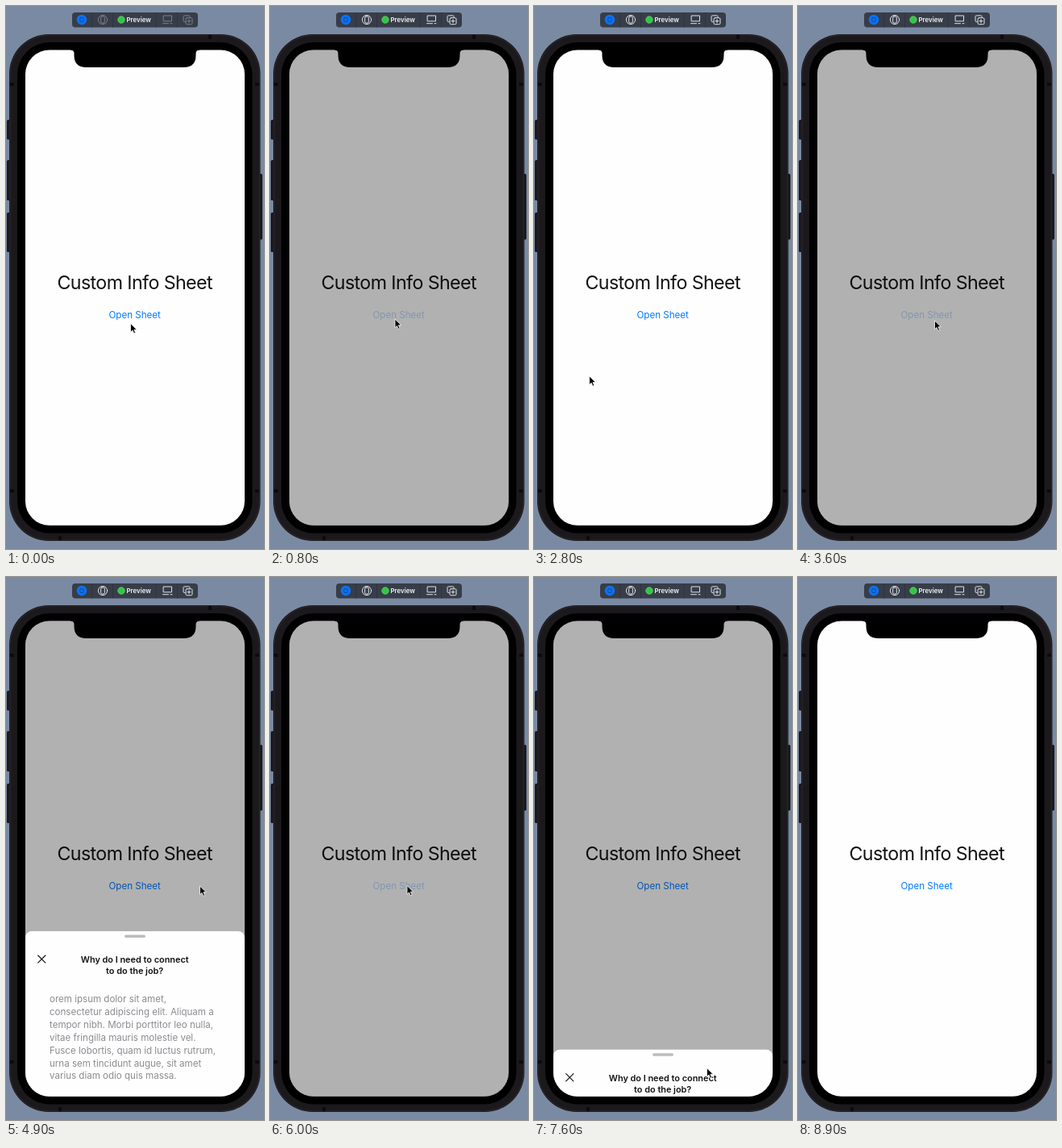
These frames come from a looping animation (320x673 px, 9.3 s). An HTML page:

```html
<!DOCTYPE html>
<html lang="en">
<head>
<meta charset="utf-8">
<title>Custom Info Sheet</title>
<style>
html, body { margin: 0; width: 100%; height: 100%; overflow: hidden; background: #7b8aa3; }
svg { display: block; width: 100%; height: 100%; }
text { font-family: Inter, Roboto, sans-serif; }
.mid { text-anchor: middle; }
.head { font-size: 10.9px; font-weight: 600; fill: #111; }
.body { font-size: 11.55px; fill: #8b8b8f; }
.line { fill: none; stroke-linecap: round; stroke-linejoin: round; }
</style>
</head>
<body>
<svg viewBox="0 0 320 673">
  <defs>
    <clipPath id="screen"><rect x="24" y="54.5" width="272" height="589.3" rx="30"/></clipPath>
  </defs>
  <rect width="320" height="673" fill="#7b8aa3"/>

  <g fill="#1b191c">
    <rect x="1" y="141" width="6" height="24.500" rx="1.500"/>
    <rect x="1" y="191" width="6" height="50" rx="1.500"/>
    <rect x="1" y="256" width="6" height="49" rx="1.500"/>
    <rect x="312" y="208" width="6" height="81.500" rx="1.500"/>
    <rect x="4" y="35" width="311.500" height="628" rx="49"/>
  </g>
  <rect x="5.200" y="36.200" width="309.100" height="625.600" rx="48" class="line" stroke="#2b292d"/>
  <g fill="#0c0b0d">
    <rect x="251" y="36" width="4" height="5"/>
    <rect x="65" y="657" width="4" height="5"/>
    <rect x="5" y="95" width="5" height="4"/>
    <rect x="5" y="599" width="5" height="4"/>
    <rect x="309" y="95" width="5" height="4"/>
    <rect x="309" y="599" width="5" height="4"/>
  </g>
  <rect x="14" y="45" width="291.500" height="608.500" rx="40"/>

  <g clip-path="url(#screen)">
    <rect x="24" y="54" width="272" height="590" fill="#fffeff"/>
    <text class="mid" x="159.700" y="351.300" font-size="23.200" letter-spacing="-.58" fill="#111">Custom Info Sheet</text>
    <text class="mid" id="open" x="159.700" y="386.700" font-size="11.600" fill="#007aff">Open Sheet</text>
    <rect id="dim" x="24" y="54" width="272" height="590" opacity=".305"/>
    <g id="sheet">
      <rect x="24" y="439" width="272" height="230" rx="8" fill="#fffeff"/>
      <rect x="147" y="443.500" width="26" height="3.600" rx="1.800" fill="#bdbcbf"/>
      <path id="close" class="line" d="M39.700 469l9.200 9.200m0-9.200l-9.200 9.200" stroke="#111" stroke-width="1.150"/>
      <text class="mid head" x="159.700" y="478">Why do I need to connect</text>
      <text class="mid head" x="159.700" y="492.100">to do the job?</text>
      <g id="copy" class="body"></g>
    </g>
  </g>
  <path d="M80 54h160v.5q-4.500 0-4.500 4.500v2q0 15-15 15h-121q-15 0-15-15v-2q0-4.500-4.500-4.500z"/>

  <rect x="82" y="8" width="156" height="18.500" rx="4" fill="#373d49"/>
  <path d="M107 8v18.500m25.500-18.500v18.500m54-18.500v18.500m26-18.500v18.500" stroke="#30353f"/>
  <circle cx="94" cy="17" r="6.200" fill="#0a72f5"/>
  <rect x="91.800" y="14.500" width="4.400" height="5" rx="1" class="line" stroke="#174a91"/>
  <circle cx="143" cy="17" r="4.300" fill="#2fc840" stroke="#7bd985" stroke-width=".6"/>
  <text x="149.500" y="20" font-size="7.900" font-weight="600" fill="#f5f6f8">Preview</text>
  <g id="tools" class="line" stroke="#e0e2e6">
    <circle cx="120" cy="17" r="5.600"/>
    <rect x="117.700" y="13" width="4.600" height="8" rx="1.200"/>
    <path d="M195.500 12h10v6.800h-10zM194.500 21.700h7m2.500 0h2"/>
    <path d="M222.300 19.500h-1q-1.300 0-1.300-1.300v-5q0-1.300 1.300-1.300h5.500q1.300 0 1.300 1.300v1"/>
    <rect x="223" y="14.700" width="8" height="8" rx="1.400"/>
    <path d="M227 16.700v4m-2-2h4"/>
  </g>

  <path id="cursor" d="M0 0v10.700l2.500-2.300 1.700 4 1.900-.8-1.700-3.900h3.400z" fill="#000" stroke="#fff" stroke-width=".8" stroke-linejoin="round"/>
</svg>
<script>
const LOOP = 9300, STEP = 100, SHEET_H = 206, GRAB_Y = 462;
const $ = id => document.getElementById(id);
const [openBtn, dim, sheet, closeBtn, copy, tools, cursor] =
  ['open', 'dim', 'sheet', 'close', 'copy', 'tools', 'cursor'].map($);

const lines = [
  'orem ipsum dolor sit amet,',
  'consectetur adipiscing elit. Aliquam a',
  'tempor nibh. Morbi porttitor leo nulla,',
  'vitae fringilla mauris molestie vel.',
  'Fusce lobortis, quam id luctus rutrum,',
  'urna sem tincidunt augue, sit amet',
  'varius diam odio quis massa.'
];
copy.innerHTML = lines.map((s, i) =>
  `<text x="54" y="${527 + i * 15.9}">${s}</text>`).join('');

// Pointer stops: time, x, y
const path = [
  [0, 154.5, 393.5], [200, 152, 381], [300, 152, 381], [500, 155, 388],
  [1300, 155, 388], [1800, 107.5, 494], [2300, 50.5, 472], [2400, 50, 471.5],
  [2600, 50, 471.5], [3400, 169.5, 390], [3600, 169.5, 390], [4400, 240.5, 383],
  [5200, 240.5, 383], [5800, 170, 382.5], [6200, 170, 382.5], [6900, 214.5, 468],
  [7100, 214, GRAB_Y], [7200, 214, GRAB_Y], [7800, 214.5, 660], [8300, 214.5, 660],
  [8400, 230, 590], [8500, 293, 104]
];
// Each visit of the sheet: shown, removed
const visits = [[800, 2700], [3600, 5300], [6000, 7700]];

const smooth = p => p * p * (3 - 2 * p);
const easeOut = p => 1 - (1 - p) ** 2;

function pointer(t) {
  const i = path.findIndex(k => k[0] > t);
  if (i < 0) return path[path.length - 1].slice(1);
  const [t0, x0, y0] = path[i - 1], [t1, x1, y1] = path[i];
  const p = smooth((t - t0) / (t1 - t0));
  return [x0 + (x1 - x0) * p, y0 + (y1 - y0) * p];
}

function pressed(t) {
  const since = Math.min(...visits.map(([a]) => t < a - 100 ? Infinity : t - a));
  return since <= 0 ? 0.28 : since <= 100 ? 0.7 : 1;
}

function draw(t) {
  const [x, y] = pointer(t);
  cursor.setAttribute('transform', `translate(${x} ${y})`);
  cursor.style.display = t < 8600 ? '' : 'none';

  const visit = visits.find(([a, b]) => t >= a && t < b);
  dim.style.display = sheet.style.display = visit ? '' : 'none';
  if (visit) {
    let drop = SHEET_H * (1 - easeOut(Math.min(1, (t - visit[0]) / 400)));
    if (t > 7200) drop = Math.max(0, y - GRAB_Y);
    sheet.setAttribute('transform', `translate(0 ${drop})`);
  }
  openBtn.setAttribute('opacity', pressed(t));
  closeBtn.setAttribute('opacity', t >= 2600 && t < 2700 ? 0.3 : 1);
  tools.setAttribute('opacity', t < 400 ? 0.4 : t < 500 ? 0.75 : 1);
}

const start = performance.now();
function tick() {
  const t = (performance.now() - start) % LOOP;
  draw(Math.floor(t / STEP) * STEP);
  requestAnimationFrame(tick);
}
tick();
</script>
</body>
</html>
```
